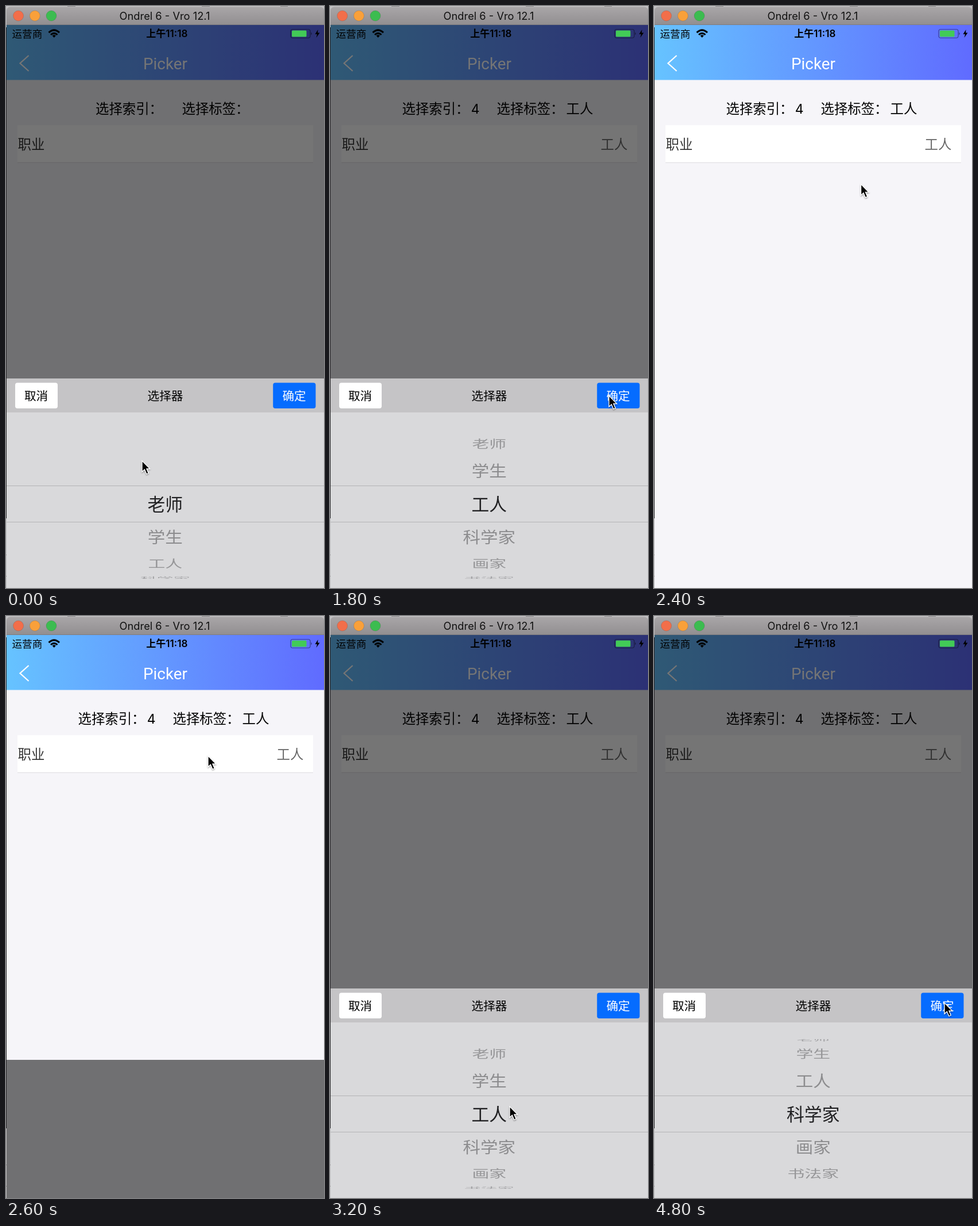
An HTML page that plays this animation: 554 px wide and 1011 px high, repeating every 5000 ms.

```html
<!DOCTYPE html>
<html lang="zh-CN">
<head>
<meta charset="utf-8">
<title>Picker</title>
<style>
html, body { margin: 0; width: 100%; height: 100%; overflow: hidden; background: #c4c3c5; }
svg { display: block; width: 554px; height: 1011px; }
text { font-family: 'Noto Sans CJK SC', 'Noto Sans CJK', sans-serif; white-space: pre; }
.latin { font-family: Inter, 'Noto Sans CJK SC', sans-serif; }
.mid { text-anchor: middle; }
.body { font-size: 23.4px; }
.small { font-size: 20.6px; }
.wheel text { font-size: 30.8px; text-anchor: middle; }
</style>
</head>
<body>
<svg viewBox="0 0 554 1011">
  <defs>
    <linearGradient id="bar" x2="0" y2="1">
      <stop stop-color="#a9a6a8"/><stop offset="1" stop-color="#918e90"/>
    </linearGradient>
    <linearGradient id="nav">
      <stop stop-color="#66c3ff"/><stop offset="1" stop-color="#606bff"/>
    </linearGradient>
    <clipPath id="screen"><rect x="1" y="33" width="553" height="978"/></clipPath>
    <clipPath id="band"><rect y="834" width="554" height="62"/></clipPath>
    <clipPath id="rest"><path d="M0 735H554V833H0ZM0 897H554V995H0Z"/></clipPath>
    <filter id="soft" x="-50%" y="-50%" width="200%" height="200%">
      <feDropShadow dx="0" dy="1.5" stdDeviation="1.2" flood-opacity=".4"/>
    </filter>
  </defs>

  <rect width="554" height="1011" fill="#c4c3c5"/>
  <rect y="37" width="1" height="853" fill="#262528"/>
  <path d="M0 953.5H1M0 990.5H1M107 .5H121M341 .5H355M478 .5H491" stroke="#8a898b"/>

  <path d="M1 33V8Q1 1.5 8 1.5H547Q554 1.5 554 8V33Z" fill="url(#bar)"/>
  <path d="M1 32.5H554" stroke="#807d7f"/>
  <g stroke="#000" stroke-opacity=".12">
    <circle cx="21.5" cy="17" r="9" fill="#f26e4a"/>
    <circle cx="50.3" cy="17" r="9" fill="#f9a03a"/>
    <circle cx="79" cy="17" r="9" fill="#3cbc50"/>
  </g>
  <text class="latin mid" x="276.5" y="24" font-size="18.3" fill="#111">Ondrel 6 - Vro 12.1</text>

  <g clip-path="url(#screen)">
    <rect y="33" width="554" height="978" fill="#f6f5f9"/>
    <rect x="1" y="33" width="553" height="95.5" fill="url(#nav)"/>
    <path d="M39.5 86L24.5 99.5L39.5 113" fill="none" stroke="#fff" stroke-width="2.3"/>
    <text class="mid" x="277.5" y="110" font-size="27.8" fill="#fff" style="font-family:Roboto,sans-serif">Picker</text>
    <rect x="20" y="207" width="515" height="65" fill="#fff"/>
    <path d="M20 272H535" stroke="#dddce0" stroke-width="1.2"/>
    <g class="body">
      <text id="index" y="187">选择索引：</text>
      <text id="label" y="187">选择标签：</text>
      <text x="20.5" y="249" fill="#333">职业</text>
      <g id="choice">
        <text class="latin" x="245.8" y="186.5" font-size="23">4</text>
        <text x="411.5" y="187">工人</text>
        <text x="471.5" y="249" fill="#666">工人</text>
      </g>
    </g>

    <g id="modal">
      <rect y="33" width="554" height="614" fill="#000" fill-opacity=".54"/>
      <rect y="647" width="554" height="59.5" fill="#c5c4c6"/>
      <rect y="706" width="554" height="305" fill="#d9d9db"/>
      <rect x="16" y="654.5" width="74" height="44.5" rx="4" fill="#fff"/>
      <rect x="465.2" y="654.5" width="74.3" height="44.5" rx="4" fill="#056cff"/>
      <text class="small mid" x="52.5" y="685.3">取消</text>
      <text class="small mid" x="277.5" y="685.3">选择器</text>
      <text class="small mid" x="502" y="685.3" fill="#fff">确定</text>
      <path d="M0 833.5H554M0 896.5H554" stroke="#b4b4b6"/>
      <g id="dim" class="wheel" clip-path="url(#rest)" fill="#1c1c1e"></g>
      <g id="lit" class="wheel" clip-path="url(#band)" fill="#202022"></g>
    </g>

    <text x="10.5" y="54.6" font-size="17.6">运营商</text>
    <g fill="none" stroke="#000" stroke-width="3">
      <path d="M74.5 46.2Q83.7 37.6 93 46.2M78 50Q83.7 44.6 89.5 50"/>
      <path d="M80.6 51.6Q83.7 49 86.9 51.6L83.7 55Z" fill="#000" stroke="none"/>
    </g>
    <text class="latin mid" x="280.3" y="54.3" font-size="17.1" font-weight="600">上午11:18</text>
    <rect x="496" y="40.5" width="34" height="15" rx="3.5" fill="none" stroke="#000" stroke-opacity=".42" stroke-width="1.2"/>
    <rect x="498" y="42.5" width="25.5" height="11" rx="1.5" fill="#42cb57"/>
    <path d="M531.5 45.5Q534 48 531.5 50.5Z" fill-opacity=".55"/>
    <path d="M543.5 41L538.5 49H542L540.5 55L546.5 46.5H543Z"/>
  </g>

  <path id="cursor" d="M0 0V19L4.4 15L7.8 23L11.2 21.5L7.9 13.8H13.6Z" stroke="#fff" stroke-width="1.3" filter="url(#soft)"/>
</svg>
<script>
const LOOP = 5000, STEP = 200;
const CLOSE = 1800, OPEN = 2574;
const HEIGHT = 978, TAU = 92.5;
const JOBS = ['老师', '学生', '工人', '科学家', '画家', '书法家'];
const RADIUS = 132, TILT = 26 * Math.PI / 180, CENTER = 865;

// places where the pointer turns: time, x, y
const STOPS = [
  [0, 237, 790], [200, 290, 846], [800, 306, 727], [1800, 486, 677], [2000, 385, 500],
  [2600, 352, 243], [3200, 313, 852], [4000, 340, 775], [4800, 506, 672]
];

const $ = id => document.getElementById(id);
const part = (t, from, to) => Math.min(1, Math.max(0, (t - from) / (to - from)));
const smooth = p => p * p * (3 - 2 * p);
const easeOut = p => 1 - (1 - p) ** 2.32;

function pointer(t) {
  const i = Math.max(1, STOPS.findIndex(s => s[0] >= t));
  const [t0, x0, y0] = STOPS[i - 1], [t1, x1, y1] = STOPS[i];
  const p = smooth(part(t, t0, t1));
  return [x0 + (x1 - x0) * p, y0 + (y1 - y0) * p];
}

// first flick by two rows, then a drag too far that settles back
function selectedRow(t) {
  return 2 * easeOut(part(t, 400, 1200))
    + 1.6 * easeOut(part(t, 3400, 3650))
    - .6 * smooth(part(t, 3900, 4700));
}

// distance left to travel, dying away like a damped spring
const remaining = dt => Math.max(0, (HEIGHT + 2) * Math.exp(-dt / TAU) - 2);

function modalOffset(t) {
  if (t < CLOSE) return 0;
  return Math.round(t < OPEN ? HEIGHT - remaining(t - CLOSE) : remaining(t - OPEN));
}

function addRows(group) {
  return JOBS.map(job => {
    const row = document.createElementNS('http://www.w3.org/2000/svg', 'text');
    row.textContent = job;
    row.setAttribute('y', 11.7);
    return group.appendChild(row);
  });
}
const dimRows = addRows($('dim')), litRows = addRows($('lit'));

function turnWheel(selected) {
  JOBS.forEach((_, i) => {
    const angle = (i - selected) * TILT, depth = Math.cos(angle);
    const shown = Math.abs(angle) < Math.PI / 2;
    const y = CENTER + RADIUS * Math.sin(angle);
    const width = 1 / (1 + .08 * (1 - depth));
    for (const row of [dimRows[i], litRows[i]]) {
      row.setAttribute('display', shown ? 'inline' : 'none');
      row.setAttribute('transform', `translate(277.3 ${y}) scale(${width} ${depth})`);
    }
    dimRows[i].setAttribute('opacity', .24 + .18 * depth);
  });
}

function draw(now) {
  const t = Math.floor(now % LOOP / STEP) * STEP;
  const chosen = t >= CLOSE;
  $('cursor').setAttribute('transform', `translate(${pointer(t)})`);
  $('modal').setAttribute('transform', `translate(0 ${modalOffset(t)})`);
  $('index').setAttribute('x', chosen ? 125.5 : 156);
  $('label').setAttribute('x', chosen ? 290.5 : 306.5);
  $('choice').setAttribute('display', chosen ? 'inline' : 'none');
  turnWheel(selectedRow(t));
}

const start = performance.now();
function tick() {
  draw(performance.now() - start);
  requestAnimationFrame(tick);
}
tick();
</script>
</body>
</html>
```
